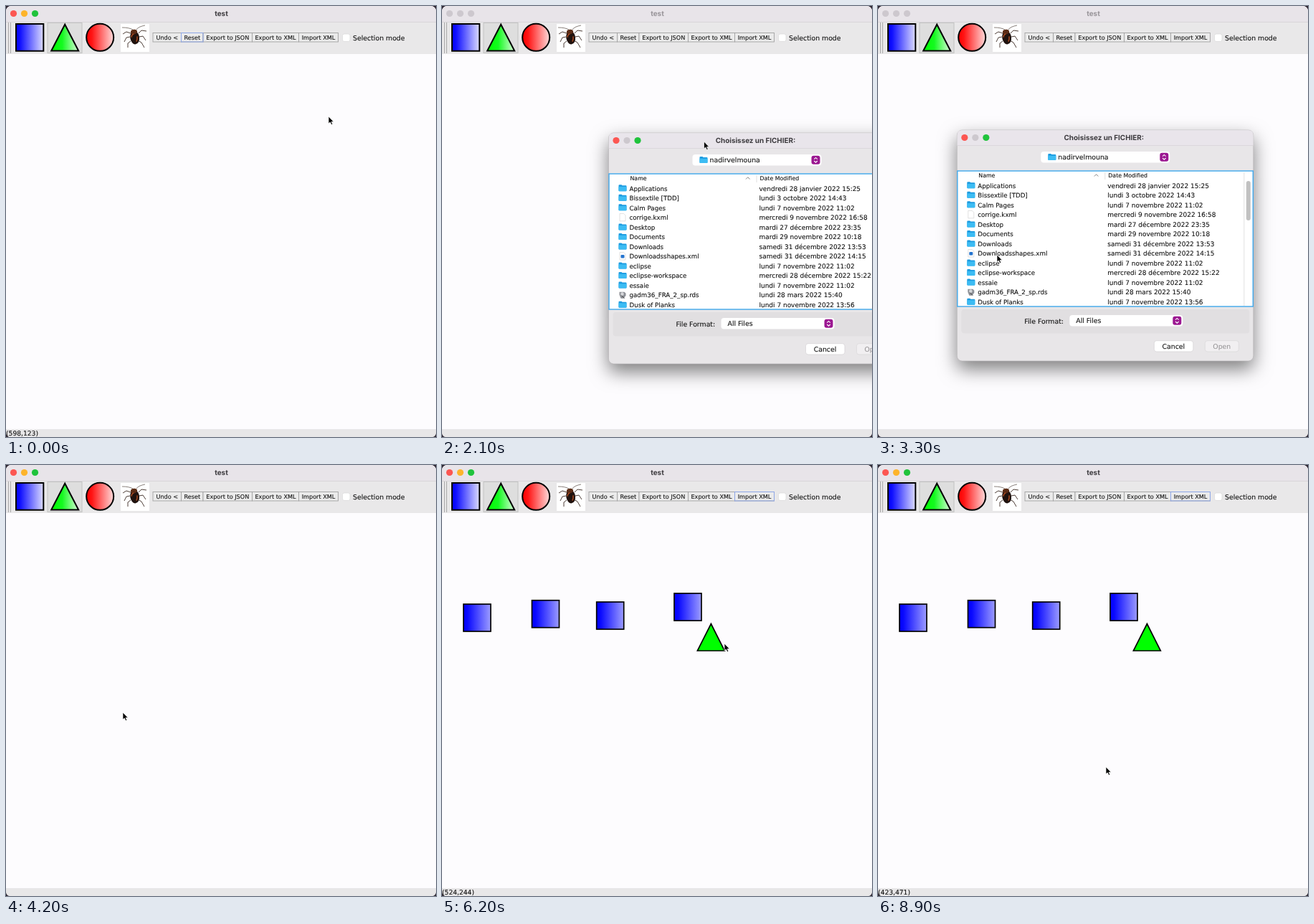
Animation of 600 by 601 pixels, one loop 9000 ms. Source, as an HTML page:

```html
<!DOCTYPE html>
<html lang="fr">
<head>
<meta charset="utf-8">
<title>test</title>
<style>
html, body { margin: 0; width: 100%; height: 100%; overflow: hidden; background: #2b2430; }
svg { display: block; width: 100%; height: 100%; }
text { font: 9.35px "DejaVu Sans", "Noto Sans", sans-serif; fill: #111; stroke: #111; stroke-width: .1; white-space: pre; text-rendering: geometricPrecision; }
.title { font: 700 9.9px Inter, Roboto, sans-serif; stroke: none; fill: #3c3a3e; }
.btn { font-size: 8.13px; }
.head { font-size: 7.85px; }
.file { font-size: 8.68px; }
.date { font-size: 8.97px; }
.status { font-size: 9.16px; }
.mid { text-anchor: middle; }
.sel text { fill: #fff; stroke: #fff; }
.off { fill: #918f91; stroke: none; }
#dialog { filter: drop-shadow(0 11px 13px rgba(0, 0, 0, .5)); }
</style>
</head>
<body>
<svg viewBox="0 0 600 601">
  <defs>
    <linearGradient id="blue"><stop stop-color="#00f"/><stop offset=".15" stop-color="#0a0aff"/><stop offset="1" stop-color="#9c9cff"/></linearGradient>
    <linearGradient id="blueIcon"><stop stop-color="#00f"/><stop offset=".15" stop-color="#1010ff"/><stop offset="1" stop-color="#dcdcff"/></linearGradient>
    <linearGradient id="greenIcon"><stop stop-color="#0f0"/><stop offset=".4" stop-color="#14fa20"/><stop offset="1" stop-color="#d8ffd8"/></linearGradient>
    <linearGradient id="redIcon"><stop stop-color="#f00"/><stop offset=".2" stop-color="#ff1414"/><stop offset="1" stop-color="#ffdada"/></linearGradient>
    <g id="folder">
      <path d="M0 1.5Q0 .5 1 .5H4L5 1.5H10Q11 1.5 11 2.5V8.5Q11 9.5 10 9.5H1Q0 9.5 0 8.5Z" fill="#1d9be0"/>
      <path d="M0 3.2H11V8.5Q11 9.5 10 9.5H1Q0 9.5 0 8.5Z" fill="#3cbcf3"/>
    </g>
    <path id="doc" d="M1.5 0H7L9.5 2.5V10.5H1.5Z" fill="#fff" stroke="#d5d5d5" stroke-width=".7"/>
    <g id="xml"><use href="#doc"/><rect x="3" y="3.5" width="5" height="4.5" rx="1" fill="#2474cf"/></g>
    <g id="data"><path d="M1 1H8L10 3V6L7 10H3L1 5Z" fill="#8d9096"/><circle cx="5" cy="4" r="2.3" fill="#d5d7da"/><path d="M4 6L8 10" stroke="#444"/></g>
    <g id="stepper">
      <rect width="12" height="12" rx="3" fill="#9b1791"/>
      <path d="M3.7 4.8L6 2.6 8.3 4.8M3.7 7.2L6 9.4 8.3 7.2" fill="none" stroke="#fff" stroke-width="1.1"/>
    </g>
  </defs>

  <rect width="600" height="601" rx="7" fill="#fdfcfe"/>
  <path d="M0 22V8Q0 0 8 0H592Q600 0 600 8V22Z" fill="#e8e4e9"/>
  <g id="lights"></g>
  <text id="title" class="title mid" x="300.5" y="14">test</text>
  <rect y="22" width="600" height="45" fill="#e9e8e9"/>
  <path d="M0 22.5H600" stroke="#d2ced3" stroke-width=".7"/>
  <path d="M3.5 23V66M6.5 23V66" stroke="#a9a9a9"/>

  <g stroke="#000" stroke-width="2">
    <rect x="14" y="25" width="38.3" height="37.7" fill="url(#blueIcon)"/>
    <rect x="58" y="23.5" width="48" height="42" fill="#dedede" stroke="#c2c2c2" stroke-width="1"/>
    <path d="M82.2 25.8L101.2 62.6H63.2Z" fill="url(#greenIcon)"/>
    <circle cx="131.2" cy="43.8" r="19" fill="url(#redIcon)"/>
  </g>
  <rect x="160" y="25" width="40" height="39" fill="#fff"/>
  <g fill="none" stroke="#3a2a22" stroke-width=".9">
    <path d="M182 33Q184 29 194 27M177 33Q172 30 162 30" stroke-width=".6"/>
    <path d="M185 38L189 34 196 35M186 43L191 42 195 48M184 48L189 51 193 58M174 38L168 36 163 39M173 43L168 44 165 50M174 49L170 52 170 58"/>
  </g>
  <g transform="rotate(-8 179 43)">
    <ellipse cx="179.5" cy="44" rx="6.4" ry="9.5" fill="#20130f"/>
    <ellipse cx="179.5" cy="36" rx="4.6" ry="3.3" fill="#5a2c16"/>
    <path d="M175 43Q176 39 179 39M181 50Q183 47 183 43" fill="none" stroke="#a9481f" stroke-width="1.5"/>
  </g>

  <g id="buttons"></g>
  <rect x="469.5" y="39" width="10.5" height="10.5" rx="2.5" fill="#fff" stroke="#d4d4d4" stroke-width=".6"/>
  <text x="484" y="48">Selection mode</text>

  <g id="shapes" stroke="#000" stroke-width="1.7"></g>
  <path d="M0 590H600V594Q600 601 595 601H5Q0 601 0 594Z" fill="#e8e7e8"/>
  <text id="status" class="status" x="0" y="599"></text>
  <g id="dialog"></g>
  <path id="cursor" d="M0 0V10L2.3 8 4 11.6 5.7 10.8 4.1 7.4H7.2Z" fill="#000" stroke="#fff" stroke-width=".7"/>
</svg>
<script>
const $ = id => document.getElementById(id);
const rect = (x, y, w, h, fill, extra = '') => `<rect x="${x}" y="${y}" width="${w}" height="${h}" fill="${fill}" ${extra}/>`;
const text = (x, y, s, cls = '') => `<text x="${x}" y="${y}" class="${cls}">${s.replace('<', '&lt;')}</text>`;
const use = (id, x, y) => `<use href="#${id}" x="${x}" y="${y}"/>`;
const lights = (y, colors) => colors.map((c, i) =>
  `<circle cx="${10.5 + 15 * i}" cy="${y}" r="4.6" fill="${c}"/>`).join('');

const grey = '#cdc8ce', red = '#fc5652', yellow = '#fdb42b', green = '#20c33c';

const edges = [205, 244.5, 275, 343.5, 408.5, 463.5];
$('buttons').innerHTML = ['Undo <', 'Reset', 'Export to JSON', 'Export to XML', 'Import XML'].map((s, i) =>
  rect(edges[i], 37.5, edges[i + 1] - edges[i], 12.5, '#ebebeb', 'stroke="#a2a2a2" stroke-width=".9"') +
  text((edges[i] + edges[i + 1]) / 2, 46.6, s, 'btn mid')).join('') +
  '<rect id="ring" y="37.5" height="12.5" fill="none" stroke="#8ea6e6"/>';
const importBox = $('buttons').querySelectorAll('rect')[4];

$('shapes').innerHTML = [[30, 194], [125.5, 188.7], [215.7, 191], [324, 179]]
  .map(([x, y]) => rect(x, y, 38, 38, 'url(#blue)')).join('') +
  '<path d="M375.4 221.5L394.3 259H356.4Z" fill="#0f0"/>';

const files = [
  ['folder', 'Applications', 'vendredi 28 janvier 2022 15:25'],
  ['folder', 'Bissextile [TDD]', 'lundi 3 octobre 2022 14:43'],
  ['folder', 'Calm Pages', 'lundi 7 novembre 2022 11:02'],
  ['doc', 'corrige.kxml', 'mercredi 9 novembre 2022 16:58'],
  ['folder', 'Desktop', 'mardi 27 décembre 2022 23:35'],
  ['folder', 'Documents', 'mardi 29 novembre 2022 10:18'],
  ['folder', 'Downloads', 'samedi 31 décembre 2022 13:53'],
  ['xml', 'Downloadsshapes.xml', 'samedi 31 décembre 2022 14:15'],
  ['folder', 'eclipse', 'lundi 7 novembre 2022 11:02'],
  ['folder', 'eclipse-workspace', 'mercredi 28 décembre 2022 15:22'],
  ['folder', 'essaie', 'lundi 7 novembre 2022 11:02'],
  ['data', 'gadm36_FRA_2_sp.rds', 'lundi 28 mars 2022 15:40'],
  ['folder', 'Dusk of Planks', 'lundi 7 novembre 2022 13:56']
];
const rows = files.map(([icon, name, date], i) => {
  const y = 80.6 + 13.53 * i;
  return `<g>${use(icon, 14, y - 8.8)}${text(29, y, name, 'file')}${text(210, y, date, 'date')}</g>`;
}).join('');

$('dialog').innerHTML =
  rect(0, 0, 413.5, 322, '#e8e6e8', 'rx="7" stroke="#b4b0b4" stroke-width=".6"') +
  '<path d="M.3 21.5V7Q.3 .3 7 .3H406.5Q413.2 .3 413.2 7V21.5Z" fill="#e9e5eb"/>' +
  '<path d="M0 21.5H413.5" stroke="#d6d1d7" stroke-width=".7"/>' +
  lights(10.5, [red, grey, green]) +
  text(205, 13.8, 'Choisissez un FICHIER:', 'title mid') +
  rect(117, 30, 180, 15.5, '#fff', 'rx="4"') + use('folder', 127, 32.5) +
  text(141, 41, 'nadirvelmouna') + use('stepper', 283, 31.8) +
  rect(.5, 57, 412.5, 189, '#fff', 'id="frame" stroke-width="1.4"') +
  text(30, 66.3, 'Name', 'head') + text(211, 66.3, 'Date Modified', 'head') +
  '<path d="M191.5 64.5L194.3 61.7 197 64.5" fill="none" stroke="#777" stroke-width=".9"/>' +
  '<path d="M206.5 59V69" stroke="#d8d8d8" stroke-width=".8"/>' +
  '<g id="list"><path d="M400.5 59V245" stroke="#e2e2e2"/>' + rect(403.5, 71, 6, 55, '#c1c1c1', 'rx="3"') +
  rect(1.5, 165.5, 398.5, 13.5, '#8a2c88', 'id="mark"') + rows + '</g>' +
  rect(6, 250, 402, 33.5, '#e1dfe1', 'rx="4"') +
  text(94, 269.6, 'File Format:') +
  rect(157, 258, 158, 15.5, '#fff', 'rx="4"') + text(166, 269.2, 'All Files') + use('stepper', 301, 259.8) +
  rect(275, 293.7, 54.5, 15.3, '#fff', 'rx="3.5" stroke="#cfcccf" stroke-width=".6"') + text(302, 304.8, 'Cancel', 'mid') +
  rect(346, 293.7, 47, 15.3, '#f1eff1', 'rx="3.5" stroke="#d6d3d6" stroke-width=".6" id="openBox"') +
  text(369.5, 304.8, 'Open', 'mid');
const selRow = $('list').querySelectorAll('g')[7];
const openText = $('dialog').lastElementChild;

// time, x, y, then the coordinates shown in the status bar
const path = [
  [0, 450, 154, 598, 123], [100, 450, 154, 598, 123], [200, 447, 140, 594, 100], [300, 447, 140, 594, 100],
  [600, 432, 40, 575, 0], [1200, 432, 40, 575, 0], [1700, 468, 190, 623, 165], [1800, 468, 190, 623, 165],
  [2400, 263, 188, 350, 163], [2800, 243, 185, 323, 159], [3300, 166, 347, 220, 373], [3400, 163, 345, 216, 371],
  [4300, 163, 345, 216, 371], [5400, 250, 300, 332, 312], [5700, 250, 300, 332, 312], [6200, 394, 249, 524, 244],
  [7300, 394, 249, 524, 244], [8100, 318, 421, 423, 471], [9000, 318, 421, 423, 471]
];
const drag = [[0, 335, 178], [1800, 335, 178], [2400, 130, 176], [2800, 110.3, 173], [9000, 110.3, 173]];

function at(keys, t) {
  const i = keys.findIndex(k => k[0] > t), a = keys[i - 1], b = keys[i];
  const p = (t - a[0]) / (b[0] - a[0]);
  return a.slice(1).map((v, j) => v + (b[j + 1] - v) * p);
}
const show = (el, on) => el.setAttribute('display', on ? 'inline' : 'none');
const move = (el, x, y) => el.setAttribute('transform', `translate(${x} ${y})`);

function draw(t) {
  const [x, y, sx, sy] = at(path, t);
  const modal = t >= 900 && t < 3900, picked = t >= 3600 && t < 3900, listed = t >= 1300;
  move($('cursor'), x, y);
  move($('dialog'), ...at(drag, t));
  show($('dialog'), modal && t >= 1000);
  show($('list'), listed);
  show($('mark'), picked);
  selRow.setAttribute('class', picked ? 'sel' : '');
  openText.setAttribute('class', picked ? 'mid' : 'mid off');
  $('openBox').setAttribute('fill', picked ? '#fff' : '#f1eff1');
  $('frame').setAttribute('stroke', listed ? '#3fa8ec' : '#a0a0a0');

  $('lights').innerHTML = lights(10.5, modal ? [grey, grey, grey] : [red, yellow, green]);
  $('title').style.fill = modal ? '#979398' : '';
  importBox.setAttribute('fill', t >= 900 && t < 1200 ? '#a09ea0' : '#ebebeb');

  const focus = t < 900 ? 1 : 4;
  show($('ring'), t < 900 || t >= 4300);
  $('ring').setAttribute('x', edges[focus]);
  $('ring').setAttribute('width', edges[focus + 1] - edges[focus]);
  show($('shapes'), t >= 4300);
  const tracked = y > 67 && (t < 900 || t >= 4400);
  $('status').textContent = tracked ? `(${Math.round(sx)},${Math.round(sy)})` : '';
}

const start = performance.now();
function loop() {
  const t = (performance.now() - start) % 9000;
  draw(Math.floor(t / 100) * 100);
  requestAnimationFrame(loop);
}
loop();
</script>
</body>
</html>
```
